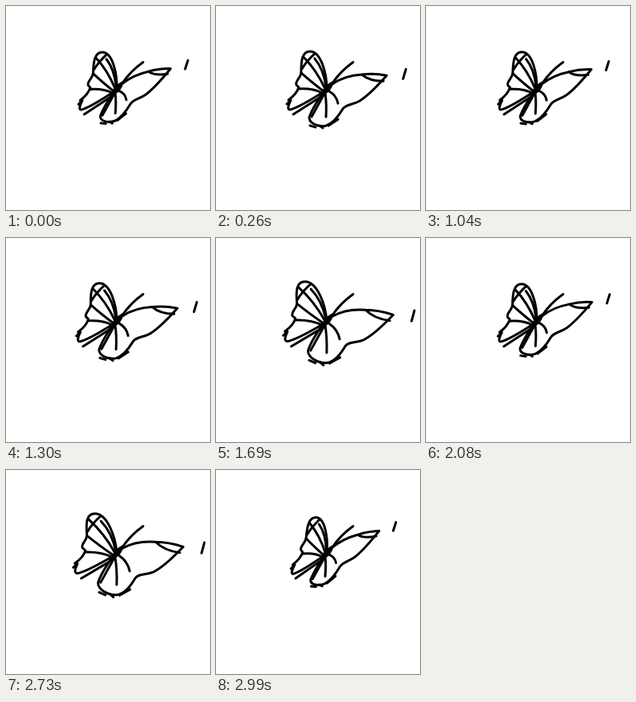
Animation of 256 by 256 pixels, one loop 3120 ms. Source, as an HTML page:

```html
<!DOCTYPE html>
<html lang="en">
<head>
<meta charset="utf-8">
<title>Butterfly</title>
<style>
  html, body { margin: 0; width: 100%; height: 100%; overflow: hidden; background: #fff; }
  svg { display: block; width: 256px; height: 256px; }
  path { fill: none; stroke: #000; stroke-width: 3; stroke-linecap: round; stroke-linejoin: round;
         vector-effect: non-scaling-stroke; }
  .thorax { fill: #000; }
</style>
</head>
<body>
<svg viewBox="0 0 256 256">
  <g id="left">
    <!-- outline -->
    <path d="M139 104C139 85 132 57 118 57C108 57 107 69 107 83C107 90 99 94 101 99L104 102C102 108 98 113 91 118"/>
    <path d="M89 123L94 118C91 124 89 130 93 130C103 128 120 117 133 109"/>
    <!-- veins -->
    <path d="M110 64Q126 80 137 104"/>
    <path d="M124 66Q135 79 138 101"/>
    <path d="M107 84Q118 94 135 107"/>
    <path d="M108 79Q114 69 124 60"/>
    <path d="M104 104Q121 103 133 109"/>
    <path d="M97 136L133 113"/>
  </g>
  <g id="right">
    <!-- outline and tip -->
    <path d="M146 98C156 91 168 87 183 86Q198 84 214 87C205 97 193 111 180 119C171 124 163 123 159 129C153 139 147 147 138 150C130 152 117 148 117 140C119 133 126 121 134 109"/>
    <path d="M183 86Q192 94 210 94"/>
    <!-- ragged hem -->
    <path d="M118 150L125 152M130 150L134 153M141 150L153 142"/>
    <!-- veins -->
    <path d="M137 109Q139 123 138 139"/>
    <path d="M142 107Q151 112 153 122"/>
    <path d="M136 110L120 139"/>
    <path d="M238 79L234.5 91"/>
  </g>
  <path d="M146 97Q156 82 172 70.5"/>
  <path class="thorax" d="M134 111L137 102L146 96Q144 106 134 111Z"/>
</svg>
<script>
const STEP = 130, LOOP = 3120;
const BODY = [138, 106];
const BEAT = [0.2, 1.9, 1, 0]; // how far open: 0 folded, 1 as drawn

// Shrink and shear each wing towards the body as it folds.
const FOLD = {
  left: { xx: 0.133, xy: 0.087, yx: 0.03, yy: 0.04 },
  right: { xx: 0.13, xy: 0.03, yx: 0.18, yy: 0.17 }
};

function pose(id, open) {
  const { xx, xy, yx, yy } = FOLD[id], f = 1 - open, [x, y] = BODY;
  const m = [1 - f * xx, -f * yx, -f * xy, 1 - f * yy,
             f * (xx * x + xy * y), f * (yx * x + yy * y)];
  document.getElementById(id).setAttribute('transform', `matrix(${m})`);
}

function render(now) {
  const n = Math.floor((now % LOOP) / STEP);
  // The beat slips slightly against the step, most visibly mid-stroke.
  const open = BEAT[n % 4] + (n % 2 ? 0 : n * 0.0115);
  pose('right', open);
  pose('left', open < 1 ? open ** 0.3 : open);
}

const start = performance.now();
(function tick() {
  render(performance.now() - start);
  requestAnimationFrame(tick);
})();
</script>
</body>
</html>
```
